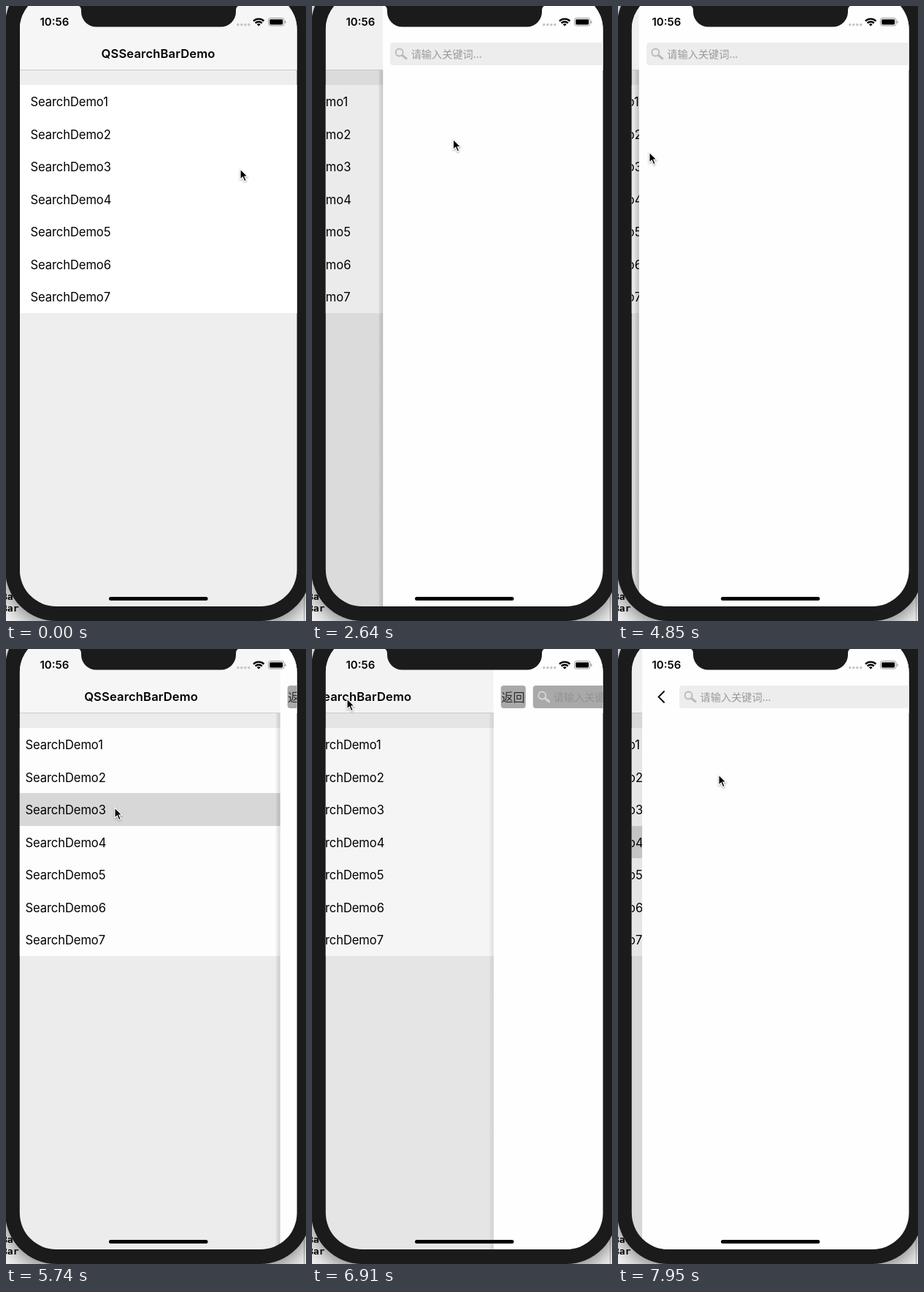
Animation of 411 by 841 pixels, one loop 8000 ms. Source, as an HTML page:

```html
<!DOCTYPE html>
<html lang="zh-CN">
<head>
<meta charset="utf-8">
<title>Search bar demo</title>
<style>
html, body { margin: 0; width: 100%; height: 100%; overflow: hidden; background: #f2f2f2; }
#stage { position: relative; width: 411px; height: 841px; overflow: hidden; font: 16.6px Inter, sans-serif; color: #000; }
#stage div, svg { position: absolute; white-space: nowrap; }
.code { left: -6px; font: bold 13px "DejaVu Sans Mono", monospace; }
.rail { left: 408px; top: 780px; width: 1px; height: 61px; background: #aaa; }
.bezel { left: -1px; top: -44px; width: 419px; height: 885px; border-radius: 70px; background: #1b1b1b; box-shadow: 0 8px 26px rgba(0,0,0,.45); }
#screen { inset: 0; clip-path: inset(-18px 12.4px 20px 18.8px round 50px); }
#list, #page { left: 18.5px; top: 0; width: 380px; height: 841px; background: #eee; }
#nav { left: 18.5px; width: 380px; height: 87px; background: #f6f6f6; border-bottom: 1px solid #cbcbcb; }
.row { width: 380px; height: 44.57px; line-height: 46.4px; text-indent: 15px; letter-spacing: -.1px; background: #fff; }
.row.on { background: #d9d9d9; }
#dim { inset: 0; background: #000; }
#title { left: 18.5px; top: 50px; width: 380px; line-height: 31px; text-align: center; font-weight: 600; letter-spacing: .12px; }
#page { background: #fefefe; }
#shade { left: -6px; top: 88px; width: 6px; height: 740px; background: linear-gradient(90deg, rgba(0,0,0,.03), rgba(0,0,0,.16)); }
#bar { top: 50px; right: 10px; height: 31px; line-height: 31px; border-radius: 4px; background: #ededed; color: #999; font-size: 14.2px; font-family: "Noto Sans CJK SC", "Noto Sans CJK", sans-serif; overflow: hidden; }
#bar span { position: absolute; left: 28.5px; }
#bar svg { left: 6px; top: 7px; stroke: #b8b8b8; }
.grey #bar { background: #a9a9a9; color: #939393; }
.grey #bar svg { stroke: #d6d6d6; }
#back { left: 10.5px; top: 50px; width: 33.5px; height: 31px; border-radius: 4px; background: #a9a9a9; color: #2a2a2a; text-align: center; font: 16px/31px "Noto Sans CJK SC", "Noto Sans CJK", sans-serif; }
#chevron { left: 20px; top: 56px; }
.clock { left: 46.5px; top: 12px; line-height: 20px; font-size: 15px; font-weight: 600; }
#cursor { left: -2px; top: -2px; filter: drop-shadow(0 1px 1px rgba(0,0,0,.35)); }
</style>
</head>
<body>
<div id="stage">
  <div class="code" style="top:800px">Ba</div>
  <div class="code" style="top:816px">Bar</div>
  <div class="rail"></div>
  <div class="bezel"></div>
  <div id="screen">
    <div id="list"></div>
    <div id="nav"></div>
    <div id="title">QSSearchBarDemo</div>
    <div id="page">
      <div id="shade"></div>
      <div id="back">返回</div>
      <svg id="chevron" width="13" height="19" fill="none" stroke="#000" stroke-width="1.8"><path d="M10.5 1.5 2.5 9.5l8 8"/></svg>
      <div id="bar">
        <svg width="18" height="18" fill="none" stroke-linecap="round"><circle cx="6.5" cy="6.5" r="5" stroke-width="1.8"/><path d="M11 10.8l5 4" stroke-width="3"/></svg>
        <span>请输入关键词...</span>
      </div>
    </div>
    <div class="clock">10:56</div>
  </div>
  <svg width="411" height="841">
    <path fill="#1b1b1b" d="M97-1Q103 0 103 6V8A20.5 20.5 0 0 0 123.5 28.5H294.5A20.5 20.5 0 0 0 315 8V6Q315 0 321-1Z"/>
    <path d="M317.8 25.6h16" stroke="#c6c6c6" stroke-width="3.6" stroke-linecap="round" stroke-dasharray="0 5"/>
    <path d="M339 20.6a10.2 10.2 0 0 1 14.4 0M341.6 23.4a6.5 6.5 0 0 1 9.2 0" fill="none" stroke="#000" stroke-width="2.3"/>
    <path d="M343.8 25.2a3.4 3.4 0 0 1 4.8 0L346.2 27.6Z"/>
    <rect x="359.5" y="16.5" width="21.5" height="10.5" rx="2.8" fill="none" stroke="#999"/>
    <rect x="361.2" y="18.2" width="18" height="7.2" rx="1.4"/>
    <path d="M382.2 20v3.8q1.5-.6 1.5-1.9t-1.5-1.9" fill="#999"/>
    <rect x="141" y="808" width="135.5" height="5" rx="2.5"/>
  </svg>
  <svg id="cursor" width="18" height="24"><path d="M2 2V16.2L5.3 13.1 7.7 18.7 10.2 17.6 7.9 12.2H12.3Z" stroke="#fff" stroke-width="1.2"/></svg>
</div>
<script>
const LOOP = 8000, STEP = 147.1, WIDTH = 380, ROW = 44.57, SWIPE = 790, LEAD = 20;
const $ = id => document.getElementById(id);

// One entry per opened page: when it slides in, when it leaves, left edge of its search bar
const visits = [
  { push: 1170, pop: 2354, left: 10.5 },
  { push: 3546, pop: 4707, left: 10.5 },
  { push: 5715, pop: 6802, left: 54, tapped: true },
  { push: 7664, pop: Infinity, left: 51.5 }
];

// Pointer moves: start, end, then where it comes to rest
const home = [321, 223];
const moves = [
  [0, 735, 206, 120],       // up to the first row
  [1177, 1471, 203, 134],
  [1471, 2206, 18, 188],    // to the screen edge
  [2354, 2889, 295, 179],   // swipe back
  [2889, 3530, 173, 175],   // second row
  [3678, 4413, 20, 200],
  [4707, 5242, 295, 200],   // swipe back
  [5242, 5590, 149, 217],   // third row
  [5737, 6620, 48, 68],     // back button
  [6914, 7649, 138, 172]    // fourth row
];

const rows = Array.from({ length: 7 }, (_, i) => {
  const row = document.createElement('div');
  row.className = 'row';
  row.textContent = 'SearchDemo' + (i + 1);
  row.style.top = 108 + i * ROW + 'px';
  $('list').append(row);
  return row;
});
const dim = document.createElement('div');
dim.id = 'dim';
$('list').append(dim);

// Cubic ease in and out, clamped
function ease(u) {
  u = Math.min(1, Math.max(0, u));
  return u < 0.5 ? 4 * u ** 3 : 1 - 4 * (1 - u) ** 3;
}

// Critically damped spring, 1 at the start falling to 0
function spring(ms) {
  const s = Math.max(0, ms) * 0.01826;
  return (1 + s) * Math.exp(-s);
}

function pointerAt(t) {
  let [x, y] = home;
  for (const [start, end, toX, toY] of moves) {
    const k = ease((t - start) / (end - start));
    x += (toX - x) * k;
    y += (toY - y) * k;
  }
  return [x, y];
}

function offset({ push, pop, tapped }, t) {
  if (t < pop) return WIDTH * spring(t - push);
  return WIDTH * (tapped ? 1 - spring(t - pop) : ease((t - pop) / SWIPE));
}

const slide = (el, x, y = 0) => el.style.transform = `translate(${x}px, ${y}px)`;
const show = (el, on) => el.style.visibility = on ? 'visible' : 'hidden';

function draw(t) {
  const index = Math.max(0, visits.filter(v => t >= v.push - LEAD).length - 1);
  const visit = visits[index];
  const x = offset(visit, t), away = WIDTH - x, covered = away / WIDTH;
  const swiping = t >= visit.pop && !visit.tapped;
  const selected = t >= visit.push - LEAD && t < visit.pop;

  slide($('list'), -0.3 * away);
  slide($('title'), -away);
  slide($('page'), x);
  slide($('cursor'), ...pointerAt(t));
  dim.style.opacity = 0.1 * covered;
  $('nav').style.filter = `brightness(${1 - 0.03 * covered})`;
  $('shade').style.opacity = swiping ? 1 : 1 - covered;
  rows.forEach((row, i) => row.classList.toggle('on', selected && i === index));

  $('page').className = index === 2 ? 'grey' : '';
  $('page').style.display = away > 0.5 ? 'block' : 'none';
  $('bar').style.left = visit.left + 'px';
  show($('back'), index === 2);
  show($('chevron'), index === 3);
}

function tick(now) {
  draw(Math.floor((now % LOOP + 8) / STEP) * STEP);
  requestAnimationFrame(tick);
}
requestAnimationFrame(tick);
</script>
</body>
</html>
```
